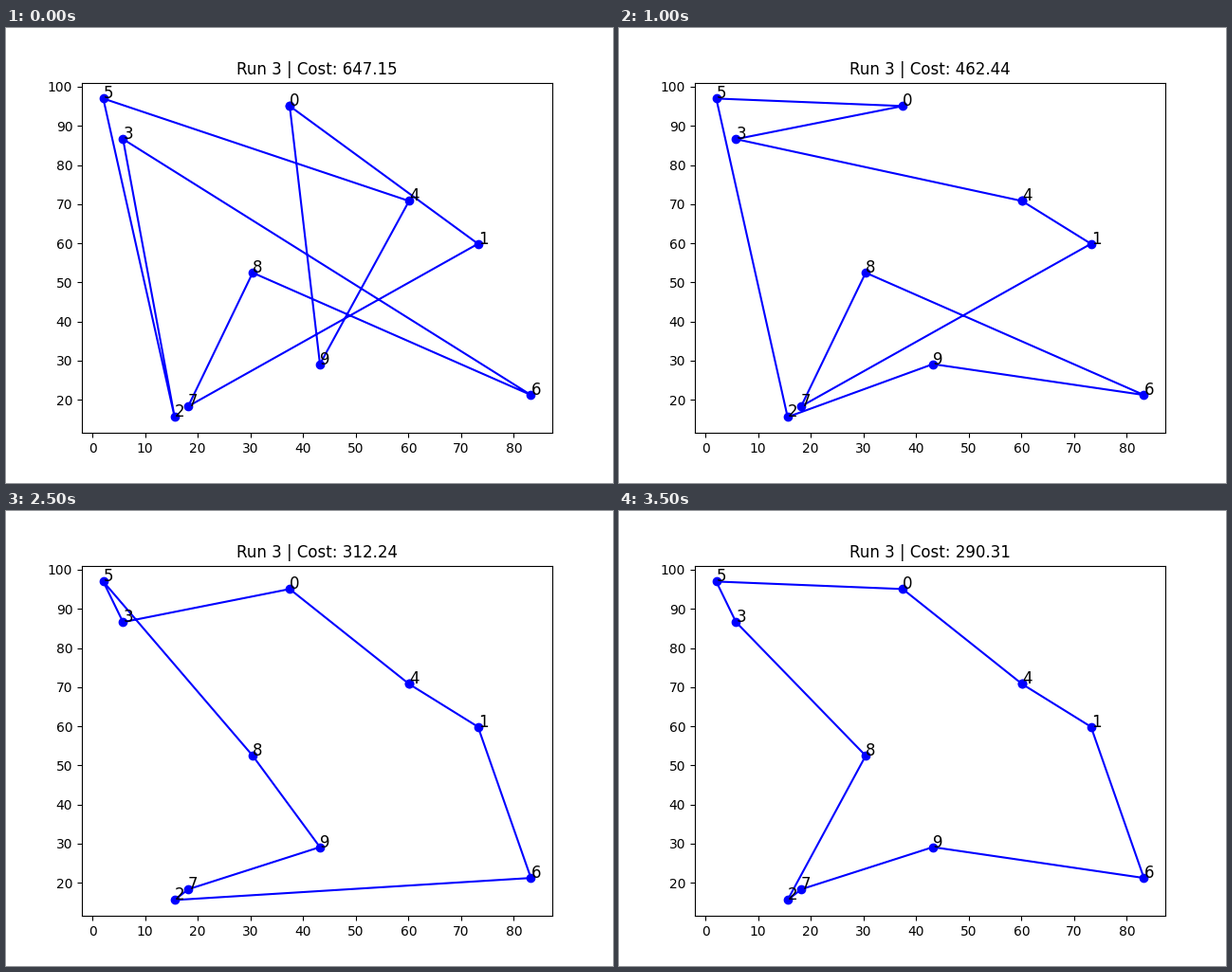
These frames come from a looping animation (640 px wide and 480 px high, 4000 ms). A matplotlib script:

```python
import numpy as np
import matplotlib.pyplot as plt
from matplotlib.animation import FuncAnimation

FRAMES = 8
INTERVAL = 500

np.random.seed(42)
cities = np.random.rand(10, 2) * 100

START = [0, 9, 4, 5, 2, 3, 6, 8, 7, 1]
# Each step of the search exchanges two cities in the tour.
SWAPS = [(9, 3), (0, 4), (2, 8), (3, 0), (6, 7), (9, 2), (5, 3)]


def tour_at(step):
    tour = list(START)
    for a, b in SWAPS[:step]:
        i, j = tour.index(a), tour.index(b)
        tour[i], tour[j] = b, a
    return tour


def closed_path(tour):
    return cities[tour + tour[:1]]


def cost(path):
    return np.hypot(*np.diff(path, axis=0).T).sum()


fig, ax = plt.subplots(figsize=(6.4, 4.8), dpi=100)
line, = ax.plot(*closed_path(START).T, "bo-")
for i, (x, y) in enumerate(cities):
    ax.text(x, y, str(i), fontsize=12)
title = ax.set_title("")


def update(step):
    path = closed_path(tour_at(step))
    line.set_data(*path.T)
    title.set_text(f"Run 3 | Cost: {cost(path):.2f}")
    return line, title


anim = FuncAnimation(fig, update, frames=FRAMES, interval=INTERVAL,
                     repeat=True, repeat_delay=0, blit=False)
plt.show()
```
